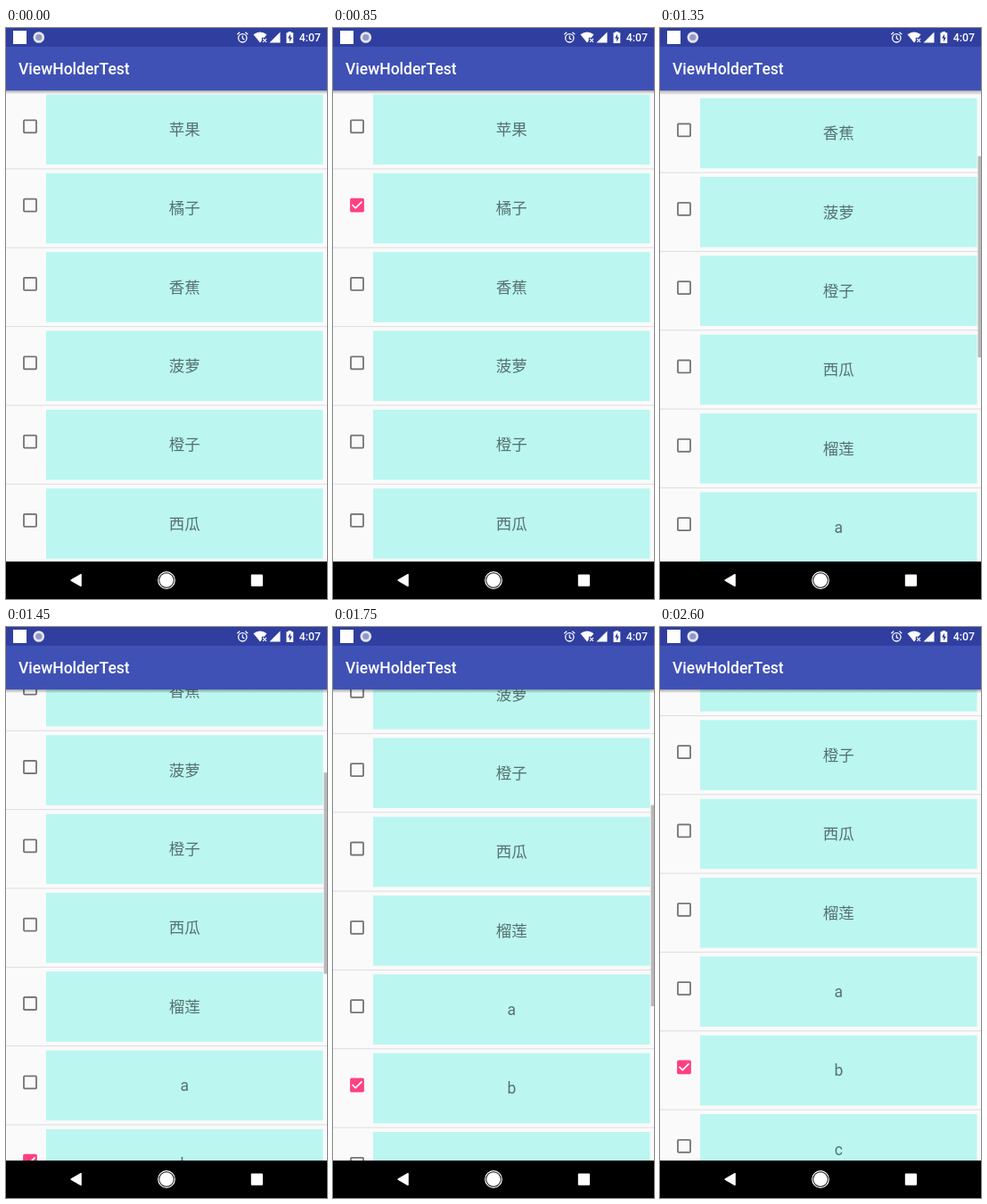
Recreate the animation shown at these times as an HTML page with a canvas. Size 360 by 640 pixels, loop 2.65 s.

```html
<!DOCTYPE html>
<html lang="zh-CN">
<head>
<meta charset="utf-8">
<style>
  html, body { margin: 0; width: 100%; height: 100%; overflow: hidden; background: #000; }
  canvas { display: block; }
</style>
</head>
<body>
<canvas id="stage" width="360" height="640"></canvas>
<script>
const ctx = document.getElementById('stage').getContext('2d');
const LOOP = 2650, STEP = 50;
const TOP = 70, BOTTOM = 598, PITCH = 265 / 3, VIEW = BOTTOM - TOP;
const FONT = 'Roboto, "Noto Sans CJK SC", "Noto Sans CJK", sans-serif';
const PAPER = '#fafafa', WHITE = '#fff', STATUS = '#303f9f', BAR = '#3f51b5',
      ACCENT = '#ff4081', CELL = '#bbf6f1', MUTED = 'rgba(0, 0, 0, .54)';
const items = ['苹果', '橘子', '香蕉', '菠萝', '橙子', '西瓜', '榴莲',
               'a', 'b', 'c', 'd', 'e', 'f', 'g'];

const drag = { start: 1050, end: 1255, to: 110, power: 1.68 };
const fling = { end: 1955, to: 323.5 };

const clamp01 = v => Math.max(0, Math.min(1, v));
const progress = (t, from, to) => clamp01((t - from) / (to - from));

// Android-like fling: a Bezier in time and distance, solved by bisection.
function flingEase(u) {
  const bezier = (s, p1, p2) => 3 * s * (1 - s) * ((1 - s) * p1 + s * p2) + s ** 3;
  let low = 0, high = 1;
  for (let i = 0; i < 24; i++) {
    const mid = (low + high) / 2;
    if (bezier(mid, 0.175, 0.65) < u) low = mid; else high = mid;
  }
  return bezier(low, 0.5, 1);
}

function scrollAt(t) {
  if (t < drag.end) return drag.to * progress(t, drag.start, drag.end) ** drag.power;
  return drag.to + (fling.to - drag.to) * flingEase(progress(t, drag.end, fling.end));
}

function rect(x, y, w, h, color) {
  ctx.fillStyle = color;
  ctx.fillRect(x, y, w, h);
}

function roundRect(x, y, w, h, r, color) {
  ctx.fillStyle = color;
  ctx.beginPath();
  ctx.roundRect(x, y, w, h, r);
  ctx.fill();
}

function disc(x, y, r, color) {
  ctx.fillStyle = color;
  ctx.beginPath();
  ctx.arc(x, y, r, 0, 2 * Math.PI);
  ctx.fill();
}

function ring(x, y, r, width, color) {
  ctx.strokeStyle = color;
  ctx.lineWidth = width;
  ctx.beginPath();
  ctx.arc(x, y, r, 0, 2 * Math.PI);
  ctx.stroke();
}

function shape(path, color) {
  ctx.fillStyle = color;
  ctx.fill(new Path2D(path));
}

function line(path, width, color) {
  ctx.lineWidth = width;
  ctx.strokeStyle = color;
  ctx.stroke(new Path2D(path));
}

function label(text, x, y, size, color, align = 'left', weight = 400) {
  ctx.font = `${weight} ${size}px ${FONT}`;
  ctx.textAlign = align;
  ctx.fillStyle = color;
  ctx.fillText(text, x, y);
}

function checkbox(x, y, checked) {
  ctx.save();
  ctx.translate(x, y);
  const hole = 6.1 * (1 - clamp01(checked * 2));
  roundRect(-7.9, -7.9, 15.8, 15.8, 1.75, checked > 0 ? ACCENT : '#737373');
  if (hole > 0) rect(-hole, -hole, 2 * hole, 2 * hole, PAPER);
  const tick = clamp01(checked * 2 - 1);
  if (tick > 0) {
    ctx.setLineDash([16 * tick, 20]);
    line('M-5.5 -.6L-1.75 3.15L5.5 -4.1', 1.75, WHITE);
  }
  ctx.restore();
}

function list(t) {
  const scroll = scrollAt(t);
  const checked = progress(t, 350, 650);
  rect(0, TOP, 360, VIEW, PAPER);
  items.forEach((name, i) => {
    const y = TOP + i * PITCH - scroll;
    if (y > BOTTOM || y + PITCH < TOP) return;
    rect(45, y + 4.5, 310.5, 78.6, CELL);
    rect(0, y + 87.4, 360, 1, '#dddde2');
    label(name, 200.3, y + 50, 17.5, MUTED, 'center');
    if (i === 1) {
      const alpha = 0.12 * progress(t, 200, 300) * (1 - progress(t, 500, 850));
      disc(27, y + 40.3, 17.5 * progress(t, 150, 450), `rgba(0, 0, 0, ${alpha})`);
    }
    // The recycled row "b" inherits the tick.
    checkbox(27, y + 40.3, i === 1 ? checked : i === 8 ? 1 : 0);
  });

  if (t > drag.start) {
    const total = items.length * PITCH;
    ctx.globalAlpha = 1 - progress(t, 2300, 2600);
    rect(356.5, TOP + scroll * VIEW / total, 3.5, VIEW * VIEW / total, '#b9b9b9');
    ctx.globalAlpha = 1;
  }

  const shadow = ctx.createLinearGradient(0, TOP, 0, TOP + 4);
  shadow.addColorStop(0, 'rgba(0, 0, 0, .34)');
  shadow.addColorStop(1, 'rgba(0, 0, 0, 0)');
  rect(0, TOP, 360, 4, shadow);
}

function statusBar() {
  rect(0, 0, 360, 21, STATUS);
  rect(8, 3, 15, 15, WHITE);
  disc(36.8, 10.5, 6.3, '#e4e6f1');
  disc(36.8, 10.5, 3.6, '#9298c8');

  // Alarm clock
  ring(265.3, 11.3, 4.7, 1.3, WHITE);
  line('M265.3 8.5V11.6L267.4 13M259.3 7.2L262.2 4.8M271.3 7.2L268.4 4.8', 1.2, WHITE);
  // Wi-Fi with a small cross
  shape('M277.5 7.3Q285 1.8 292.5 7.3L289.8 10.7H286.8V14.2L285 16.5Z', WHITE);
  line('M288.2 12L292 15.8M292 12L288.2 15.8', 1.1, WHITE);
  // Signal
  shape('M307.5 4.5V16.5H295.5Z', WHITE);
  // Battery
  shape('M314.5 5.3H316.6V4H320V5.3H322.2V17H314.5Z', WHITE);
  shape('M319 6.8L316 11.6H318V15.4L321 10.4H319Z', STATUS);
  label('4:07', 353, 15.2, 12.3, WHITE, 'right', 500);
}

function appBar() {
  rect(0, 21, 360, TOP - 21, BAR);
  label('ViewHolderTest', 14, 52.3, 17.5, WHITE, 'left', 500);
}

function navBar() {
  rect(0, BOTTOM, 360, 640 - BOTTOM, '#000');
  ctx.lineJoin = 'round';
  const back = 'M73.2 619L84 612.7V625.3Z';
  shape(back, WHITE);
  line(back, 1.6, WHITE);
  ctx.lineJoin = 'miter';
  disc(180, 619, 7.8, WHITE);
  ring(180, 619, 9.3, 1.2, WHITE);
  roundRect(274.8, 612.5, 13.2, 13.2, 1, WHITE);
}

function frame(now) {
  const t = Math.floor((now % LOOP) / STEP) * STEP;
  list(t);
  statusBar();
  appBar();
  navBar();
  requestAnimationFrame(frame);
}
frame(performance.now());
</script>
</body>
</html>
```
